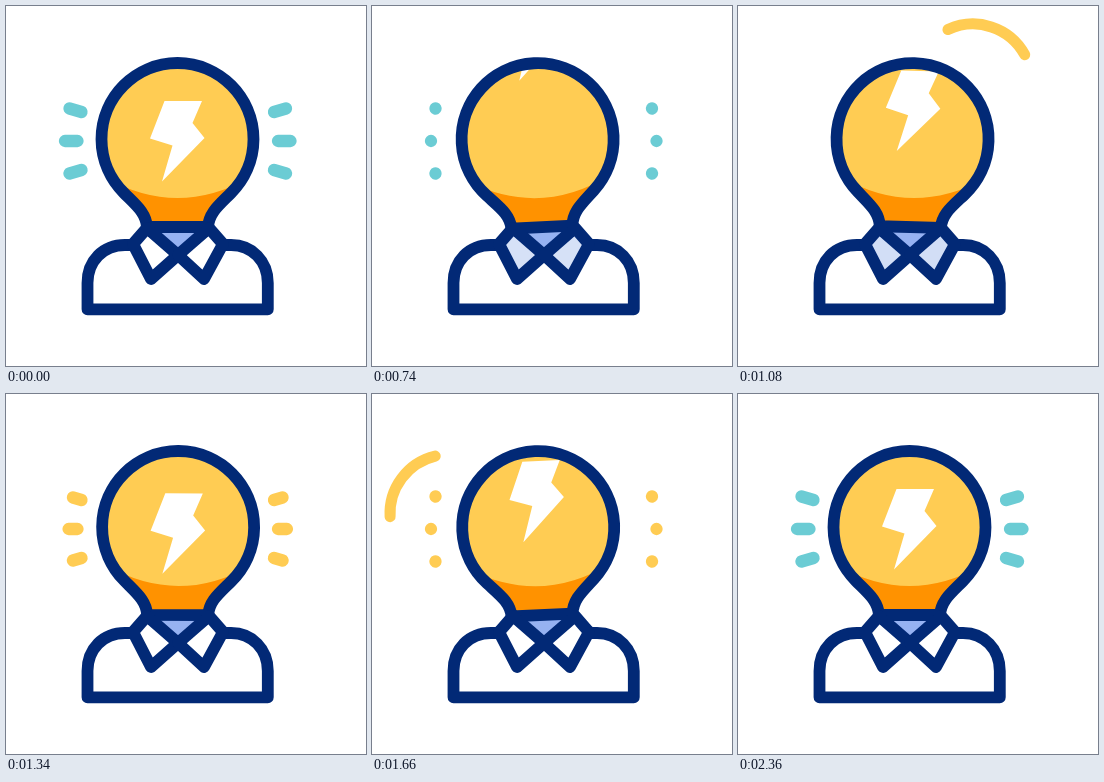
Write an HTML page that moves like this. It is 360 by 360 pixels and loops after 3.22 s.

```html
<!DOCTYPE html>
<html lang="en">
<head>
<meta charset="utf-8">
<title>Bright idea</title>
<style>
  html, body { margin: 0; width: 100%; height: 100%; overflow: hidden; background: #fff; }
  svg { display: block; width: 100vw; height: 100vh; }
  .line { fill: none; stroke: #022976; stroke-width: 11.8; stroke-linecap: round; stroke-linejoin: round; }
  #rays { fill: none; stroke-width: 12.3; stroke-linecap: round; }
  #sweep { fill: none; stroke: #ffcc53; stroke-width: 11; stroke-linecap: round; }
</style>
</head>
<body>
<svg viewBox="0 0 360 360">
  <defs>
    <path id="bulb" d="M141 221C140 207 131 200 118 187A76 76 0 1 1 225 187C212 200 203 207 202 221Z"/>
    <clipPath id="inside"><use href="#bulb"/></clipPath>
  </defs>
  <path id="rays"/>
  <path id="sweep"/>
  <path d="M144 222H200L172 248Z" fill="#96b2f2"/>
  <path class="line" d="M126 239H119C97 239 81.500 255 81.500 277V303.300H261.800V277C261.800 255 246 239 225 239H218"/>
  <g id="head">
    <g clip-path="url(#inside)">
      <path d="M80 40H265V230H80Z" fill="#ffcc53"/>
      <path d="M100 172Q171.500 212 243 172V230H100Z" fill="#ff9200"/>
      <path id="bolt" d="M158.500 95H196L186.500 117L198.500 132L156 175.500L166.500 139.500L144 132.500Z" fill="#fff"/>
    </g>
    <use href="#bulb" class="line"/>
  </g>
  <g class="line" id="collar">
    <path d="M141 222L127 238L145 273L172 249Z"/>
    <path d="M203 222L217 238L198 273L172 249Z"/>
  </g>
</svg>
<script>
const LOOP = 3220;
const TEAL = '#6bccd4', YELLOW = '#ffcc53';
const el = id => document.getElementById(id);
const progress = (t, from, to) => Math.min(1, Math.max(0, (t - from) / (to - from)));
const smooth = p => (1 - Math.cos(Math.PI * p)) / 2;
const easeIn = p => p ** 3;
const easeOut = p => 1 - (1 - p) ** 2;

// Keys are [time, value, easing towards this key].
function track(keys, t) {
  const i = keys.findIndex(key => key[0] > t);
  if (i === 0) return keys[0][1];
  if (i < 0) return keys.at(-1)[1];
  const [t0, v0] = keys[i - 1], [t1, v1, ease = smooth] = keys[i];
  return v0 + (v1 - v0) * ease(progress(t, t0, t1));
}

const swing = [[240, 0], [430, 3.1], [780, -3], [1170, 2.1], [1590, -3], [1970, 2.8], [2360, 0]];
const lift = [
  [460, 0], [760, -125, easeIn], [890, -125], [1290, 6, easeOut], [1430, 0],
  [1490, 0], [1770, -125, easeIn], [1880, -125], [2260, 6, easeOut], [2360, 0]
];
const shade = [[560, 0], [780, 1], [1180, 1], [1300, 0]];

// Rays on the left, inner end then outer end; the right side is mirrored.
const rays = [[75.5, 106, 63.5, 102.5], [71.5, 135, 59, 135], [75.5, 164, 63.5, 167.5]];

function raysPath(inner, outer) {
  let d = '';
  for (const [x0, y0, x1, y1] of rays) {
    const at = (p, flip) => {
      const x = x0 + (x1 - x0) * p;
      return `${flip ? 343.5 - x : x} ${y0 + (y1 - y0) * p}`;
    };
    for (const flip of [false, true]) d += `M${at(inner, flip)}L${at(outer, flip)}`;
  }
  return d;
}

function drawRays(t) {
  let inner = 0, outer = 1, color = TEAL, visible = true;
  if (t < 1180) {
    inner = smooth(progress(t, 560, 735));
    visible = t < 770;
  } else if (t < 2120) {
    color = YELLOW;
    outer = smooth(progress(t, 1180, 1430));
    inner = smooth(progress(t, 1490, 1655));
    visible = t < 1700;
  } else {
    outer = smooth(progress(t, 2120, 2350));
  }
  el('rays').setAttribute('d', visible ? raysPath(inner, outer + 0.001) : '');
  el('rays').setAttribute('stroke', color);
}

const sweeps = [
  { start: 760, x: 235, y: 77, from: 0, to: -115 },
  { start: 1340, x: 77, y: 119.5, from: -77, to: -183 }
];

function sweepPath({ start, x, y, from, to }, t) {
  const u = t - start;
  if (u <= 0 || u >= 540) return '';
  const point = p => {
    const a = (from + (to - from) * p) * Math.PI / 180;
    return `${x + 59 * Math.cos(a)} ${y + 59 * Math.sin(a)}`;
  };
  const tail = smooth(progress(u, 210, 540)), tip = smooth(progress(u, 0, 310));
  return `M${point(tail)}A59 59 0 0 0 ${point(tip + 0.001)}`;
}

function draw(t) {
  el('head').setAttribute('transform', `rotate(${track(swing, t)} 171.5 253)`);
  el('bolt').setAttribute('transform', `translate(0 ${track(lift, t)})`);
  const s = track(shade, t);
  el('collar').style.fill = `rgb(${255 - 45 * s}, ${255 - 33 * s}, ${255 - 9 * s})`;
  drawRays(t);
  el('sweep').setAttribute('d', sweeps.map(sweep => sweepPath(sweep, t)).join(''));
}

let begin;
function tick(now) {
  begin ??= now;
  draw((now - begin) % LOOP);
  requestAnimationFrame(tick);
}
draw(0);
requestAnimationFrame(tick);
</script>
</body>
</html>
```
